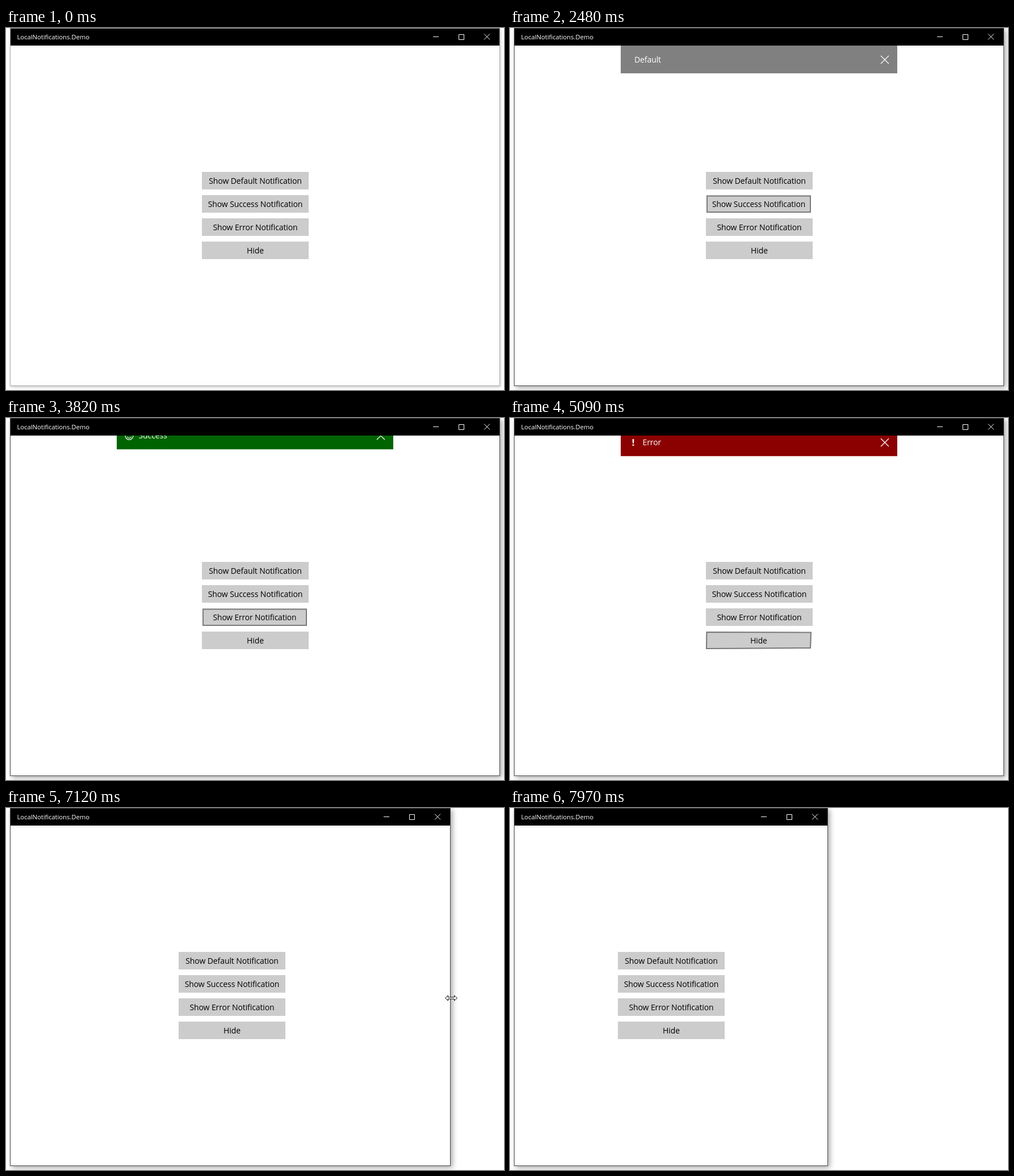
These frames come from a looping animation (877x639 px, 8 s). An HTML page:

```html
<!DOCTYPE html>
<html lang="en">
<head>
<meta charset="utf-8">
<title>Notifications demo</title>
<style>
  html, body { margin: 0; width: 100%; height: 100%; overflow: hidden; background: #fff; }
  #frame { position: absolute; left: 0; top: 0; height: 639px; overflow: hidden; }
  #win { position: absolute; left: 7px; top: 0; height: 632px; box-sizing: border-box;
         border: 1px solid #484848; background: #fff; box-shadow: 3px 3px 9px rgba(0,0,0,.36); }
  #win.idle { border-color: #aaa; box-shadow: 1px 2px 5px rgba(0,0,0,.22); }
  #bar { height: 30px; background: #000; }
  svg { position: absolute; left: 0; top: 0; }
  text { font: 14px "Open Sans", "Noto Sans", sans-serif; letter-spacing: -.1px; }
  .title { font-size: 11.3px; font-weight: 500; fill: #fff; letter-spacing: -.05px; }
  .line { fill: none; stroke: #fff; }
</style>
</head>
<body>
<div id="frame"><div id="win"><div id="bar"></div></div></div>
<svg width="877" height="639" viewBox="0 0 877 639">
  <defs><clipPath id="content"><rect x="8" y="31" width="861" height="600"/></clipPath></defs>
  <text class="title" x="19.5" y="20">LocalNotifications.Demo</text>
  <path id="controls" class="line" d="M-118 15.5h10M-72.5 11.5h9v9h-9zM-28 10.5l10 10M-18 10.5l-10 10"/>
  <g id="buttons"></g>
  <g clip-path="url(#content)">
    <g id="note">
      <rect id="noteBg" x="195" y="31" width="487" height="49"/>
      <g id="smile" class="line" stroke-width="1.2">
        <circle cx="217" cy="56" r="7"/>
        <path d="M213 58q4 4.5 8 0M214.5 53v1.6M219.5 53v1.6"/>
      </g>
      <path id="bang" fill="#fff" d="M215.5 50h3l-.5 7.5h-2zM215.6 59.2h2.8v2.6h-2.8z"/>
      <text id="noteText" y="61" fill="#fff"></text>
      <path class="line" stroke-width="1.2" d="M653 49l14 14M667 49l-14 14"/>
    </g>
  </g>
  <path id="cursor" fill="#fff" stroke="#000" d="M-10.5 0l5-4.5v3h11v-3l5 4.5l-5 4.5v-3h-11v3z"/>
</svg>
<script>
const LOOP = 8000, HEIGHT = 49;
const $ = id => document.getElementById(id);
const clamp = v => Math.max(0, Math.min(1, v));
const ramp = (t, a, b) => clamp((t - a) / (b - a));
const show = (el, on) => el.style.display = on ? '' : 'none';

// hover, press start, press end, release; corner shifts while pressed
const corners = [1, .5, -3, .5, -3, 0, 1, 0];
const buttons = [
  { label: 'Show Default Notification', hover: 860, press: 1020, up: 1300, corners },
  { label: 'Show Success Notification', hover: 2110, press: 2270, up: 2620, corners },
  { label: 'Show Error Notification', hover: 3450, press: 3610, up: 3920, corners },
  { label: 'Hide', hover: 4600, press: 4800, up: 5240, corners: [.5, 0, -2, .5, -3, -1, 0, 0] }
];
const notes = [
  { label: 'Default', color: '#808080', enter: [1420, 1750], leave: [2490, 2710], from: 0 },
  { label: 'Success', color: '#006400', enter: [2710, 2990], leave: [3700, 3940], from: 0 },
  { label: 'Error', color: '#8b0000', enter: [4050, 4370], leave: [5090, 5270], from: 12.5 }
];

function add(parent, tag) {
  return parent.appendChild(document.createElementNS('http://www.w3.org/2000/svg', tag));
}

buttons.forEach((b, i) => {
  b.y = 254 + 41 * i;
  b.face = add($('buttons'), 'path');
  b.face.setAttribute('fill', '#cccccc');
  b.edge = add($('buttons'), 'path');
  b.edge.setAttribute('fill', 'none');
  b.edge.setAttribute('stroke', '#7a7a7a');
  b.edge.setAttribute('stroke-width', 2);
  b.text = add($('buttons'), 'text');
  b.text.setAttribute('text-anchor', 'middle');
  b.text.textContent = b.label;
});

function quad(b, tilt, inset) {
  const d = b.corners.map(v => v * tilt);
  const l = inset, r = 188 - inset, h = 31 - inset;
  return `M${l + d[0]} ${l + d[1]}L${r + d[2]} ${l + d[3]}L${r + d[4]} ${h + d[5]}L${l + d[6]} ${h + d[7]}z`;
}

function drawButton(b, t, left) {
  const tilt = ramp(t, b.press, b.press + 120) * (1 - ramp(t, b.up, b.up + 120));
  const at = `translate(${left} ${b.y})`;
  for (const [el, inset] of [[b.face, 0], [b.edge, 1]]) {
    el.setAttribute('d', quad(b, tilt, inset));
    el.setAttribute('transform', at);
  }
  show(b.edge, t >= b.hover && t < b.up + 120);
  b.text.setAttribute('transform', `translate(${left + 94 - tilt} ${b.y + 21}) scale(${1 - .015 * tilt})`);
}

function drawNote(t) {
  const n = notes.find(n => t >= n.enter[0] && t < n.leave[1]);
  show($('note'), n);
  if (!n) return;
  const out = t < n.leave[0] ? 0 : n.from + (HEIGHT - n.from) * ramp(t, ...n.leave);
  const y = -HEIGHT * (1 - ramp(t, ...n.enter)) - out;
  $('note').setAttribute('transform', `translate(0 ${y})`);
  $('noteBg').setAttribute('fill', n.color);
  $('noteText').textContent = n.label;
  $('noteText').setAttribute('x', n.label === 'Default' ? 219 : 233.5);
  show($('smile'), n.label === 'Success');
  show($('bang'), n.label === 'Error');
}

// right edge of the window: speeds up, drags steadily, slows down
function edgeAt(t) {
  const start = 6760, gain = 216, speed = .345, brake = 7540;
  const s = Math.max(0, Math.min(t, brake) - start);
  const moved = s < gain ? speed * s * s / (2 * gain) : speed * (s - gain / 2);
  const left = 1 - ramp(t, brake, 7970);
  return Math.round(870 - moved - 78 * (1 - left * left));
}

function draw(t) {
  const edge = edgeAt(t);
  $('frame').style.width = Math.min(877, edge + 14) + 'px';
  $('win').style.width = edge - 7 + 'px';
  $('win').className = t < 60 ? 'idle' : '';
  $('controls').setAttribute('transform', `translate(${edge} 0)`);
  const lag = t > 6900 && t < 7800 ? 2 : 0;
  const left = Math.round((edge + 8) / 2 - 94 + lag);
  buttons.forEach(b => drawButton(b, t, left));
  drawNote(t);
  show($('cursor'), t >= 6760 && t < 7960);
  $('cursor').setAttribute('transform', `translate(${edge + 1} ${Math.round(327 + 15 * ramp(t, 6760, 7390)) - .5})`);
}

function tick(now) {
  draw(now % LOOP);
  requestAnimationFrame(tick);
}
draw(0);
requestAnimationFrame(tick);
</script>
</body>
</html>
```
